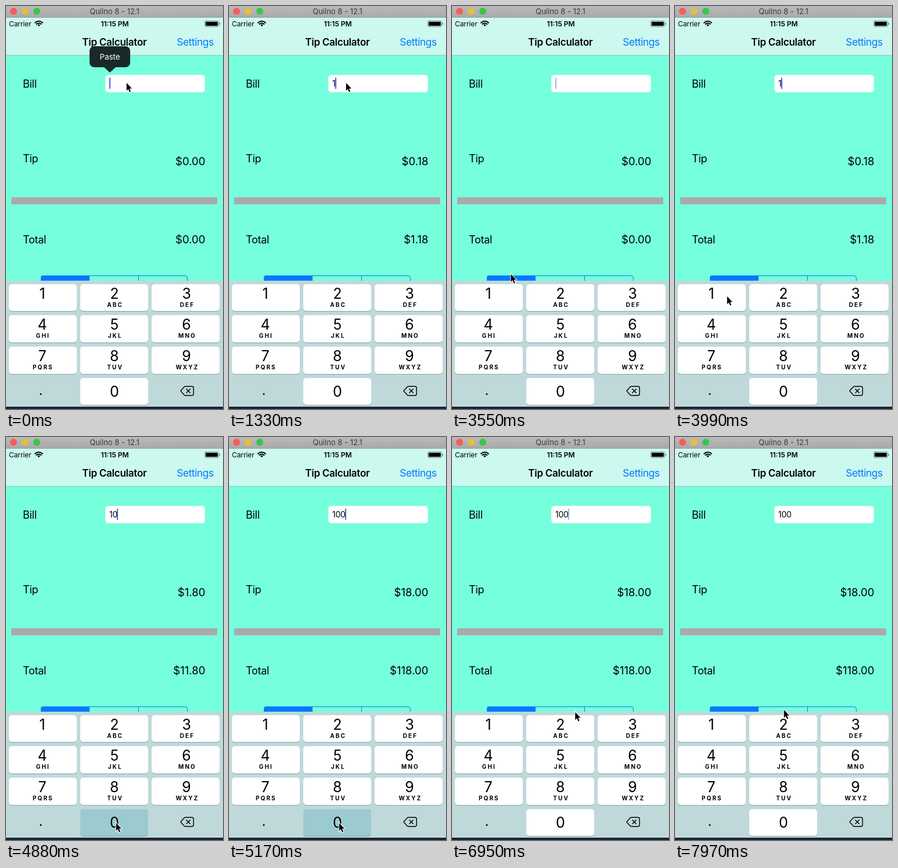
These frames come from a looping animation (374x691 px, 8 s). An HTML page with a canvas:

```html
<!DOCTYPE html>
<html lang="en">
<head>
<meta charset="utf-8">
<title>Tip Calculator</title>
<style>
html, body { margin: 0; width: 100%; height: 100%; overflow: hidden; background: #75ffdc; }
canvas { display: block; width: 374px; height: 691px; }
</style>
</head>
<body>
<canvas id="stage"></canvas>
<script>
const W = 374, H = 691, LOOP = 8000, STEP = 147.55;
const BLUE = '#007aff';
const canvas = document.getElementById('stage');
const ctx = canvas.getContext('2d');
const dpr = window.devicePixelRatio || 1;
canvas.width = W * dpr;
canvas.height = H * dpr;

// The screen refreshes in steps; all times below are step numbers.
// bill: [step, text, step the caret blink restarts]
const bills = [[0, '', 0], [9, '1', 9], [17, '', 16], [26, '1', 26], [33, '10', 33], [35, '100', 35]];
// pointer: [step, x, y]
const path = [
  [0, 207, 131], [4, 207, 131], [6, 201, 131], [20, 201, 131], [25, 89, 497],
  [28, 89, 497], [32, 189, 661], [39, 189, 661], [40, 262, 570], [41, 260, 516],
  [46, 218, 472], [49, 193, 468], [51, 191, 468], [54, 187, 467]
];
// presses: [from, to, key]
const presses = [[25, 27, '1'], [32, 34, '0'], [35, 36, '0']];
const keys = ['1', '2', '3', '4', '5', '6', '7', '8', '9', '.', '0', 'del'];
const letters = { 2: 'ABC', 3: 'DEF', 4: 'GHI', 5: 'JKL', 6: 'MNO', 7: 'PQRS', 8: 'TUV', 9: 'WXYZ' };

function rect(x, y, w, h, color) {
  ctx.fillStyle = color;
  ctx.fillRect(x, y, w, h);
}

function round(x, y, w, h, r, color) {
  ctx.beginPath();
  ctx.roundRect(x, y, w, h, r);
  ctx.fillStyle = color;
  ctx.fill();
}

function poly(points, close = true) {
  ctx.beginPath();
  points.forEach(([x, y]) => ctx.lineTo(x, y));
  if (close) ctx.closePath();
}

function stroke(color, width) {
  ctx.strokeStyle = color;
  ctx.lineWidth = width;
  ctx.stroke();
}

function setFont(size, weight, spacing) {
  ctx.font = `${weight} ${size}px Inter, Roboto, sans-serif`;
  ctx.letterSpacing = spacing + 'px';
}

function text(str, x, y, size, { color = '#000', weight = 400, align = 'left', gap = 0 } = {}) {
  setFont(size, weight, gap);
  ctx.textAlign = align;
  ctx.fillStyle = color;
  const shift = { left: 0, center: gap / 2, right: gap }[align];
  ctx.fillText(str, x + shift, y);
}

function drawTitleBar() {
  const g = ctx.createLinearGradient(0, 0, 0, 20);
  g.addColorStop(0, '#b9b9b9');
  g.addColorStop(1, '#a9a9a9');
  rect(0, 0, W, 20, g);
  rect(0, 19, W, 1, '#959d9b');
  ['#fc5b57', '#e5bf3c', '#34c84a'].forEach((c, i) => {
    ctx.beginPath();
    ctx.arc(13 + 20 * i, 9, 6, 0, 7);
    ctx.fillStyle = c;
    ctx.fill();
  });
  text('Quilno 8 - 12.1', 187, 14, 13, { color: '#3c3c3c', align: 'center' });
}

function drawWifi() {
  const x = 56.5, y = 35, a = Math.PI / 4;
  [[9, 2.1], [5.6, 2]].forEach(([r, w]) => {
    ctx.beginPath();
    ctx.arc(x, y, r, -3 * a, -a);
    stroke('#000', w);
  });
  ctx.beginPath();
  ctx.moveTo(x, y);
  ctx.arc(x, y, 3.2, -3 * a, -a);
  ctx.fillStyle = '#000';
  ctx.fill();
}

function drawNavBar() {
  rect(0, 20, W, 64, '#cbf8ef');
  rect(0, 84, W, 1, '#8fcabb');
  text('Carrier', 5, 34.5, 12, { gap: -0.1 });
  drawWifi();
  text('11:15 PM', 187.5, 34.5, 12, { weight: 600, align: 'center' });
  ctx.beginPath();
  ctx.roundRect(342.5, 25.5, 24, 10, 2.5);
  stroke('rgba(0, 0, 0, .45)', 1);
  round(344, 27, 21, 7, 1.2, '#000');
  round(367.5, 28.5, 1.5, 4, 0.7, 'rgba(0, 0, 0, .45)');
  text('Tip Calculator', 187, 68, 17, { weight: 600, align: 'center', gap: -0.25 });
  text('Settings', 358.2, 68, 17.5, { color: BLUE, align: 'right', gap: -0.5 });
}

function caretAlpha(age) {
  const m = age % 8;
  if (age === 0 || (m > 0 && m < 4)) return 1;
  return m % 4 ? 0 : 0.5;
}

function drawForm(n) {
  const [, bill, reset] = bills.filter(b => b[0] <= n).pop();
  const label = { gap: -0.3 }, value = { align: 'right' };
  const money = v => '$' + v.toFixed(2);
  text('Bill', 29, 139.5, 18.1, label);
  text('Tip', 29, 267.5, 18.1, label);
  text('Total', 29, 406.5, 18.1, label);
  text(money(bill * 0.18), 343.5, 272.5, 18.6, value);
  text(money(bill * 1.18), 343.5, 406.5, 18.6, value);
  rect(9, 328, 355, 12, '#aaa');

  round(171, 118, 172, 30, 5, '#d8f4ec');
  round(171.5, 118.5, 171, 29, 4.5, '#fff');
  text(bill, 178, 138, 14, { gap: -0.3 });
  const alpha = n >= 54 ? 0 : caretAlpha(n - reset);
  if (alpha) {
    ctx.globalAlpha = alpha;
    rect(178 + Math.floor(ctx.measureText(bill).width), 123, 2, 19, '#4365e2');
    ctx.globalAlpha = 1;
  }

  ctx.beginPath();
  ctx.roundRect(60.5, 462.5, 252, 28, 4);
  stroke(BLUE, 1);
  round(60, 462, 84, 29, [4, 0, 0, 4], BLUE);
  rect(228, 462, 1, 29, BLUE);
}

function drawDelete() {
  ctx.lineJoin = ctx.lineCap = 'round';
  ctx.beginPath();
  ctx.moveTo(301, 660);
  ctx.lineTo(307, 653.3);
  ctx.quadraticCurveTo(308, 652.3, 309.5, 652.3);
  ctx.lineTo(320.5, 652.3);
  ctx.quadraticCurveTo(323.3, 652.3, 323.3, 655);
  ctx.lineTo(323.3, 665);
  ctx.quadraticCurveTo(323.3, 667.7, 320.5, 667.7);
  ctx.lineTo(309.5, 667.7);
  ctx.quadraticCurveTo(308, 667.7, 307, 666.7);
  ctx.closePath();
  stroke('#000', 1.4);
  [-1, 1].forEach(s => {
    poly([[311, 660 - 3.2 * s], [317.4, 660 + 3.2 * s]], false);
    stroke('#000', 1.5);
  });
}

function drawKeyboard(n) {
  rect(0, 471, W, 216, '#bfd9da');
  rect(0, 687, W, 4, '#1a2338');
  const press = presses.find(p => n >= p[0] && n < p[1]);
  keys.forEach((key, i) => {
    const col = i % 3, drop = 53.7 * Math.floor(i / 3);
    const x = 5 + 123 * col, mid = 62.5 + 124.3 * col;
    const y = Math.floor(477 + drop), h = Math.round(523.3 + drop) - y;
    const center = { align: 'center' };
    if (key === 'del') return drawDelete();
    if (key === '.') return text('.', mid - 2.5, 667, 24, center);
    round(x, y + 1, 117, h, 5, '#8a9fa1');
    round(x, y, 117, h, 5, press && press[2] === key ? '#9bcbd0' : '#fff');
    text(key, mid, y + (key === '0' ? 31.5 : 25), 25, center);
    if (letters[key]) text(letters[key], mid + 0.3, y + 39, 10, { weight: 700, align: 'center', gap: 2.1 });
  });
}

function drawPaste(n) {
  if (n > 1) return;
  ctx.globalAlpha = n ? 0.4 : 1;
  ctx.beginPath();
  ctx.roundRect(144, 69, 70, 36, 8);
  ctx.moveTo(169, 105);
  ctx.lineTo(189, 105);
  ctx.lineTo(179, 114);
  ctx.closePath();
  ctx.fillStyle = '#182927';
  ctx.fill();
  text('Paste', 179, 92, 13.5, { color: '#fff', align: 'center', gap: -0.1 });
  ctx.globalAlpha = 1;
}

function pointerAt(n) {
  const i = path.findIndex(p => p[0] > n);
  if (i < 0) return path[path.length - 1].slice(1);
  const [a, x, y] = path[i - 1], [b, x2, y2] = path[i];
  const k = (n - a) / (b - a), e = k * k * (3 - 2 * k);
  return [x + (x2 - x) * e, y + (y2 - y) * e];
}

function drawPointer(n) {
  const [x, y] = pointerAt(n);
  ctx.save();
  ctx.translate(x, y);
  ctx.lineJoin = 'miter';
  poly([[0.8, 0.8], [0.8, 14.2], [3.8, 11.4], [6, 16.6], [8.1, 15.7], [5.9, 10.6], [10, 10.4]]);
  stroke('#fff', 2);
  ctx.fillStyle = '#000';
  ctx.fill();
  ctx.restore();
}

function draw() {
  const t = performance.now() % LOOP;
  const n = Math.min(54, Math.floor((t + 6) / STEP));
  ctx.setTransform(dpr, 0, 0, dpr, 0, 0);
  rect(0, 0, W, H, '#75ffdc');
  drawTitleBar();
  drawNavBar();
  drawForm(n);
  drawKeyboard(n);
  drawPaste(n);
  drawPointer(n);
  requestAnimationFrame(draw);
}
draw();
</script>
</body>
</html>
```
